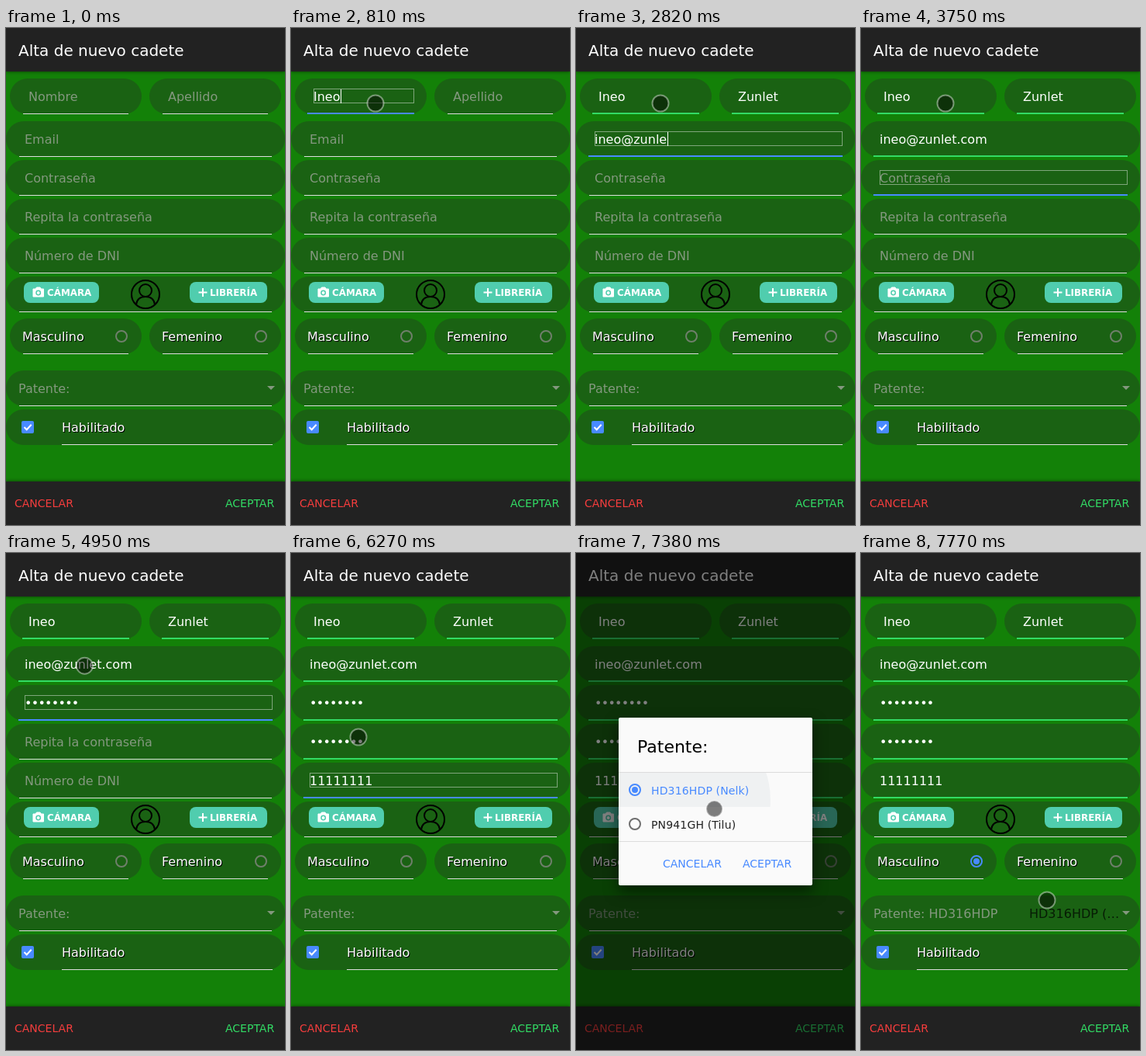
An HTML page for the animation above (7.8 s loop, 360 by 640 pixels).

```html
<!DOCTYPE html>
<html lang="es">
<head>
<meta charset="utf-8">
<title>Alta de nuevo cadete</title>
<style>
  html, body { margin: 0; width: 100%; height: 100%; overflow: hidden; background: #138108; }
  svg { display: block; width: 360px; height: 640px; font: 16px "DejaVu Sans", Verdana, sans-serif; }
  text { white-space: pre; }
  .label { filter: drop-shadow(1px 1px 0 #000); }
  .paper { filter: drop-shadow(0 8px 9px rgba(0, 0, 0, .5)); }
  .bar { filter: drop-shadow(0 0 2px rgba(0, 0, 0, .6)); }
</style>
</head>
<body>
<svg id="stage" viewBox="0 0 360 640"></svg>
<script>
const LOOP = 7800;
const BLUE = '#488aff', GREEN = '#32db64', RED = '#f53d3d', GRAY = '#84987f', LINE = '#dedede';
const stage = document.getElementById('stage');
const pen = document.createElement('canvas').getContext('2d');
pen.font = '16px "DejaVu Sans", Verdana, sans-serif';

// Every field is typed from `start`, one character per `step`, after an optional pause.
const fields = [
  { x: 5, y: 65, w: 170, pad: 24, hint: 'Nombre', text: 'Ineo', focus: 480, start: 600, step: 70, blur: 900 },
  { x: 185, y: 65, w: 170, pad: 24, hint: 'Apellido', text: 'Zunlet', focus: 900, start: 1000, step: 60, blur: 1480 },
  { x: 0, y: 120, w: 360, pad: 24, hint: 'Email', text: 'ineo@zunlet.com', focus: 1480, start: 1650, step: 125, blur: 3560 },
  { x: 0, y: 170, w: 360, pad: 24, hint: 'Contraseña', text: '••••••••', focus: 3560, start: 3840, step: 110, blur: 5010 },
  { x: 0, y: 220, w: 360, pad: 24, hint: 'Repita la contraseña', text: '••••••••', focus: 5010, start: 5070, step: 35, blur: 5400 },
  { x: 0, y: 270, w: 360, pad: 24, hint: 'Número de DNI', text: '11111111', focus: 5400, start: 5490, step: 30, blur: 6510,
    pauseAt: 5, pause: 120 }
];
const plates = ['HD316HDP (Nelk)', 'PN941GH (Tilu)'];

// Pointer path: time, x, y
const path = [
  [60, 250, 330], [420, 109, 97], [4920, 109, 97], [5010, 87, 237], [6300, 87, 237],
  [6450, 149, 398], [6570, 149, 398], [6750, 225, 467], [6960, 225, 467],
  [7200, 140, 318], [7290, 140, 318], [7380, 178, 329], [7500, 244, 400],
  [7620, 244, 400], [7740, 240, 447]
];

const clamp = v => Math.max(0, Math.min(1, v));
const span = (t, a, b) => clamp((t - a) / (b - a));

const rect = (x, y, w, h, fill, more = '') =>
  `<rect x="${x}" y="${y}" width="${w}" height="${h}" fill="${fill}" ${more}/>`;
const circle = (x, y, r, fill, more = '') =>
  `<circle cx="${x}" cy="${y}" r="${r}" fill="${fill}" ${more}/>`;
const text = (x, y, s, fill, size = 16, more = '') =>
  `<text x="${x}" y="${y}" fill="${fill}" font-size="${size}" ${more}>${s}</text>`;
const pill = (x, y, w) => rect(x, y, w, 46, '#1a6213', 'rx="23"');
const underline = (x, y, w, color = LINE, h = 1) => rect(x, y + 46 - h, w, h, color);
const row = (x, y, w) => pill(x, y, w) + underline(x + 17, y, w - 34);

function radio(x, y, on, off = '#6f7f6b') {
  const color = on ? BLUE : off;
  return circle(x, y, 7, 'none', `stroke="${color}" stroke-width="2"`) + (on ? circle(x, y, 4, color) : '');
}

function field(f, t) {
  const charTime = i => f.start + i * f.step + (i >= f.pauseAt ? f.pause : 0);
  let n = 0;
  while (n < f.text.length && t >= charTime(n)) n++;
  const focused = t >= f.focus && t < f.blur;
  const left = f.x + f.pad, base = f.y + 29;
  const typed = f.text.slice(0, n);
  const tight = f.text[0] === '•' ? -.75 : 0;

  let out = pill(f.x, f.y, f.w);
  out += focused ? underline(f.x + 16, f.y, f.w - 32, BLUE, 2)
    : n ? underline(f.x + 16, f.y, f.w - 32, GREEN, 2)
    : underline(f.x + 17, f.y, f.w - 34);
  out += n ? text(left, base, typed, '#fff', 16, `letter-spacing="${tight}"`) : text(left, base, f.hint, GRAY);
  if (focused) {
    out += rect(left + .5, f.y + 13.5, f.w - f.pad - 17, 18, 'none', 'stroke="#e4ebe3" stroke-dasharray="1 1"');
    const since = t - (n ? charTime(n - 1) : f.focus);
    const caret = left + pen.measureText(typed).width + n * tight + 1;
    if (since % 500 < 150) out += rect(Math.round(caret), f.y + 14, 1, 18, '#fff');
  }
  return out;
}

function photoRow() {
  const button = (x, w) => rect(x, 327, w, 27, '#50cdae', 'rx="8"');
  const word = (x, s) => text(x, 345, s, '#fff', 11.9, 'font-weight="bold"');
  return row(0, 320, 360) + button(23, 97) + button(237, 100)
    + '<path d="M35 336h3l1.5-2h4.500l1.5 2h3v10h-13.500z" fill="#fff" stroke="#fff" stroke-linejoin="round"/>'
    + circle(41.7, 341, 2.7, 'none', 'stroke="#50cdae" stroke-width="1.5"')
    + '<path d="M248.5 340.5h11m-5.5-5.5v11" stroke="#fff" stroke-width="2"/>'
    + word(53, 'CÁMARA') + word(263, 'LIBRERÍA')
    + '<g fill="none" stroke="#000" stroke-width="2">' + circle(180, 343, 18, 'none')
    + circle(180, 338, 8, 'none') + '<path d="M168 356c1-7 6-10 12-10s11 3 12 10"/></g>';
}

function choiceRow(t) {
  const item = (x, s, on) => row(x, 374, 170) + text(x + 16, 403, s, '#fff', 16, 'class="label"')
    + radio(x + 144, 397, on);
  return item(5, 'Masculino', t >= 6540) + item(185, 'Femenino', false);
}

function plateRow(t) {
  const chosen = t >= 7620, code = plates[0].split(' ')[0];
  const grow = t - 6800;
  let out = row(0, 441, 360);
  if (grow > 0 && grow < 260)
    out += `<g clip-path="url(#plateRow)">${circle(225, 467, grow * .35, '#000', `opacity="${.1 * (1 - span(grow, 140, 260))}"`)}</g>`;
  out += text(16, 470, 'Patente:' + (chosen ? ' ' + code : ''), GRAY);
  if (chosen) out += text(217, 470, code + ' (…', '#071c05');
  return out + `<path d="M337 461h10l-5 5z" fill="${GRAY}"/>`;
}

const checkRow = pill(0, 491, 360) + underline(72, 491, 272)
  + rect(20, 506, 16, 16, BLUE, 'rx="2"')
  + '<path d="M23.5 514l3.2 3.2 6-6.4" fill="none" stroke="#fff" stroke-width="2"/>'
  + text(72, 520, 'Habilitado', '#fff', 16, 'class="label"');

const bars = rect(0, 0, 360, 56, '#222', 'class="bar"') + text(16, 36, 'Alta de nuevo cadete', '#fff', 20)
  + rect(0, 584, 360, 56, '#222', 'class="bar"')
  + text(11, 617, 'CANCELAR', RED, 14) + text(283, 617, 'ACEPTAR', GREEN, 14);

const defs = '<defs><clipPath id="plateRow">' + rect(0, 441, 360, 46, '#000', 'rx="23"')
  + '</clipPath><clipPath id="option">' + rect(55, 283, 250, 44, '#000') + '</clipPath></defs>';

function dialog(t) {
  const enter = span(t, 6870, 7006), leave = span(t, 7650, 7755);
  const alpha = enter * (1 - leave);
  if (!alpha) return '';
  const scale = 1.1 - .1 * enter - .1 * leave;
  const grow = t - 7260;
  let out = rect(55, 212, 250, 216, '#fafafa', 'rx="2" class="paper"');
  if (grow > 0)
    out += `<g clip-path="url(#option)">${circle(140, 318, grow * 110 / 120, '#eff1f2', `opacity="${1 - span(grow, 180, 300)}"`)}</g>`;
  out += text(79, 257, 'Patente:', '#000', 22) + rect(55, 282, 250, 1, '#dcdcdc') + rect(55, 371, 250, 1, '#dcdcdc');
  plates.forEach((s, i) => {
    const on = i === 0 && t >= 7320, y = 305 + 44 * i;
    out += radio(76, y, on, '#6e6e6e') + text(97, y + 6, s, on ? BLUE : '#222', 14, 'letter-spacing=".15"');
  });
  out += text(112, 405, 'CANCELAR', BLUE, 14) + text(215, 405, 'ACEPTAR', BLUE, 14);
  return rect(0, 0, 360, 640, '#000', `opacity="${alpha * .5}"`)
    + `<g opacity="${alpha}" transform="translate(180 320) scale(${scale}) translate(-180 -320)">${out}</g>`;
}

function pointer(t) {
  if (t < path[0][0]) return '';
  let i = 0;
  while (i < path.length - 2 && t >= path[i + 1][0]) i++;
  const [a, x, y] = path[i], [b, u, v] = path[i + 1], k = span(t, a, b);
  return circle(x + (u - x) * k, y + (v - y) * k, 10.5, 'rgba(0,0,0,.5)', 'stroke="rgba(255,255,255,.42)" stroke-width="2"');
}

function draw(now) {
  const t = now % LOOP;
  stage.innerHTML = defs + rect(0, 0, 360, 640, '#138108')
    + fields.map(f => field(f, t)).join('')
    + photoRow() + choiceRow(t) + plateRow(t) + checkRow + bars + dialog(t) + pointer(t);
}

const begin = performance.now();
function tick() {
  draw(performance.now() - begin);
  requestAnimationFrame(tick);
}
tick();
</script>
</body>
</html>
```
